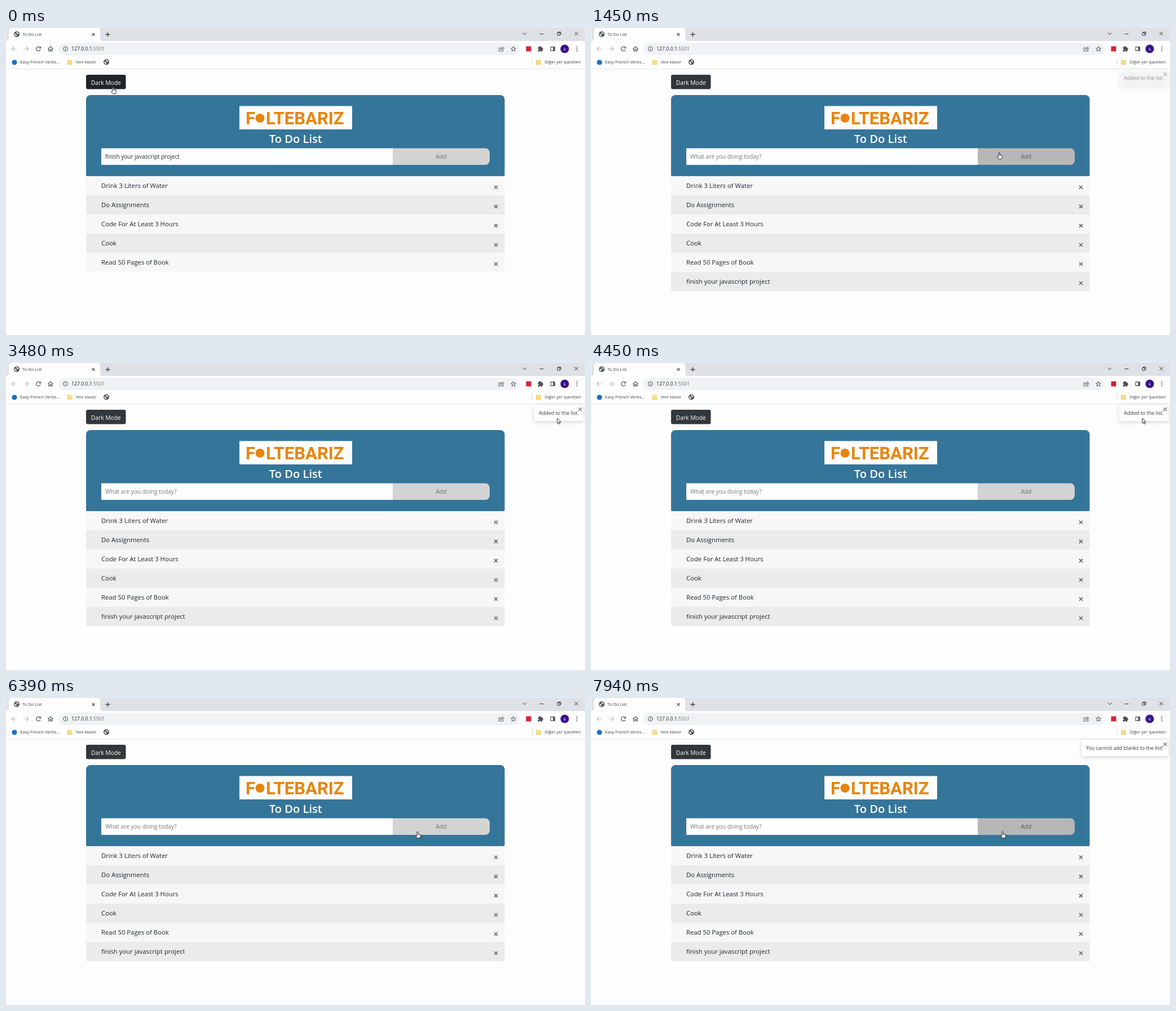
Write an HTML page with a canvas that moves like this. It is 1027 px wide and 545 px high and loops after 8 s.

```html
<!DOCTYPE html>
<html lang="en">
<head>
<meta charset="utf-8">
<title>To Do List</title>
<style>
html, body { margin: 0; width: 100%; height: 100%; overflow: hidden; background: #fdfdfd; }
canvas { display: block; width: 1027px; height: 545px; }
</style>
</head>
<body>
<canvas id="stage"></canvas>
<script>
const W = 1027, H = 545, LOOP = 8000, STEP = 96.83;
const canvas = document.getElementById('stage');
const ctx = canvas.getContext('2d');
const dpr = window.devicePixelRatio || 1;
canvas.width = W * dpr;
canvas.height = H * dpr;

const SANS = '"Open Sans", "Noto Sans", sans-serif';
const INK = '#4d5156';
const ROW_TOP = 263, ROW_H = 34.05;
const ADDED_AT = 1350;
const TASKS = ['Drink 3 Liters of Water', 'Do Assignments', 'Code For At Least 3 Hours',
  'Cook', 'Read 50 Pages of Book', 'finish your javascript project'];

// Pointer tip: time, x, y
const PATH = [
  [0, 190, 105], [100, 190, 105], [1150, 724, 221], [2000, 724, 221],
  [2600, 865, 170], [2750, 865, 170], [3500, 978, 98], [5400, 978, 98],
  [6100, 781, 267], [6380, 730, 237], [LOOP, 730, 237]
];

const clamp = v => Math.min(1, Math.max(0, v));
const ramp = (t, a, b) => clamp((t - a) / (b - a));
const ease = u => u * u * (3 - 2 * u);
const mix = (a, b, u) => a + (b - a) * u;
const rgb = (a, b, u) => `rgb(${a.map((v, i) => Math.round(mix(v, b[i], u))).join(',')})`;

function box(x, y, w, h, fill, radius = 0) {
  ctx.fillStyle = fill;
  ctx.beginPath();
  ctx.roundRect(x, y, w, h, radius);
  ctx.fill();
}

function disc(x, y, r, fill) {
  ctx.fillStyle = fill;
  ctx.beginPath();
  ctx.arc(x, y, r, 0, Math.PI * 2);
  ctx.fill();
}

function ring(x, y, r, color, width = 1, from = 0, to = Math.PI * 2) {
  ctx.strokeStyle = color;
  ctx.lineWidth = width;
  ctx.beginPath();
  ctx.arc(x, y, r, from, to);
  ctx.stroke();
}

// Strokes or fills SVG path data at an offset
function shape(d, x, y, { stroke, fill, width = 1 }) {
  ctx.save();
  ctx.translate(x, y);
  const p = new Path2D(d);
  if (fill) { ctx.fillStyle = fill; ctx.fill(p); }
  if (stroke) {
    ctx.strokeStyle = stroke;
    ctx.lineWidth = width;
    ctx.lineJoin = 'round';
    ctx.stroke(p);
  }
  ctx.restore();
}

function text(str, x, y, size, color, { align = 'left', weight = 400, family = SANS } = {}) {
  ctx.font = `${weight} ${size}px ${family}`;
  ctx.textAlign = align;
  ctx.fillStyle = color;
  ctx.fillText(str, x, y);
}

function cross(x, y, r, color, width) {
  shape(`M${-r} ${-r}L${r} ${r}M${r} ${-r}L${-r} ${r}`, x, y, { stroke: color, width });
}

function globe(x, y) {
  disc(x, y, 5, INK);
  shape('M-3.8 -1.2Q-2 -.6 -1 .6L.3 1.4L-.6 3.6Q-3.6 3 -3.8 -1.2Z', x, y, { fill: '#f4f5f6' });
  shape('M-.8 -3.8Q2.4 -3.6 3.5 -.8L1.8 .2L.6 -1.4L-.8 -1.6Z', x, y, { fill: '#f4f5f6' });
}

function folder(x, y) {
  shape('M-4.5 -4.5H-1L0 -3.4H4.5V4.5H-4.5Z', x, y, { fill: '#f8dc83' });
  box(x - 4.5, y + 3.2, 9, 1.3, '#f1cc62');
}

function tabStrip() {
  box(0, 0, W, 23, '#dee1e6');
  box(0, 0, 1, 22, '#f3f4f6');
  box(5, 0, 162, 24, '#fefefe', [5, 5, 0, 0]);
  shape('M0 23Q5 23 5 18V23ZM167 18Q167 23 172 23H167Z', 0, 0, { fill: '#fefefe' });
  globe(19, 11);
  text('To Do List', 29, 14, 7.6, '#3c4043');
  cross(155, 11.5, 2.4, '#3c4043', 1.2);
  shape('M-4 0H4M0 -4V4', 180.5, 11.5, { stroke: '#3c4043', width: 1.3 });
  shape('M-3.5 -1.7L0 1.7L3.5 -1.7', 920, 10, { stroke: '#333' });
  shape('M-3.5 0H3.5', 950, 10.5, { stroke: '#333' });
  shape('M-3 -1.5H1.5V3H-3ZM-1.5 -1.5V-3H3V1.5H1.5', 981, 10, { stroke: '#333' });
  cross(1011.5, 10, 3.2, '#333', 1);
}

function toolbar() {
  box(0, 23, W, 49, '#fefefe');
  shape('M4.5 0H-4M0 -4L-4 0L0 4', 14.5, 37, { stroke: '#babcbe', width: 1.1 });
  shape('M-4.5 0H4M0 -4L4 0L0 4', 36, 37, { stroke: '#babcbe', width: 1.1 });
  ring(57.5, 37, 3.8, INK, 1.2, 0.4, 5.5);
  shape('M4.6 -4.6V-.8H.8Z', 57.5, 37, { fill: INK });
  shape('M-4.6 .2L0 -4L4.6 .2M-3.2 -.8V4H-1V.9H1V4H3.2V-.8', 79, 37, { stroke: INK, width: 1.1 });

  box(93, 26.5, 818, 21.5, '#f0f2f4', 10.7);
  ring(105.5, 37, 3.9, INK, 1);
  shape('M0 -.5V2.2M0 -2.2V-1.2', 105.5, 37, { stroke: INK, width: 1 });
  text('127.0.0.1', 116, 40.2, 8.7, '#292c30');
  const hostWidth = ctx.measureText('127.0.0.1').width;
  text(':5501', 116 + hostWidth, 40.2, 8.7, '#6d7176');

  shape('M-1 -2H-4.4V4H3.4V2M-2 1.6Q-1.5 -1.8 2 -1.8V-3.8L5 -1L2 1.6V-.2Q-.5 -.2 -2 1.6Z',
    878.5, 37, { stroke: INK, width: 0.9 });
  let star = '';
  for (let i = 0; i < 10; i++) {
    const a = -Math.PI / 2 + i * Math.PI / 5, r = i % 2 ? 2 : 4.6;
    star += `${i ? 'L' : 'M'}${r * Math.cos(a)} ${r * Math.sin(a)}`;
  }
  shape(star + 'Z', 900, 37.4, { stroke: INK, width: 1 });
  box(922.5, 32.5, 9, 9, '#dc2033');
  box(943.5, 34, 8, 8, INK, 1);
  disc(947, 33.5, 1.5, INK);
  disc(951.5, 37.5, 1.5, INK);
  disc(943.8, 38, 1.2, '#fefefe');
  disc(947.5, 41.8, 1.2, '#fefefe');
  box(965.5, 33, 8.5, 8, INK, 1);
  box(966.7, 34.3, 3.7, 5.4, '#fefefe');
  disc(991, 37, 7.6, '#38128c');
  text('k', 991, 39.8, 8, '#eee8fa', { align: 'center' });
  for (const y of [33.5, 37, 40.5]) disc(1012.5, y, 1, INK);

  disc(15, 61, 4.6, '#1672c4');
  text('Easy French Verbs...', 25, 63, 7.65, '#3c4043');
  folder(113, 60.5);
  text('Yeni klasör', 123.5, 63, 7.35, '#3c4043');
  globe(178, 60.5);
  box(933, 55, 1, 11, '#d3d6da');
  folder(944.5, 60.5);
  text('Diğer yer işaretleri', 955.5, 63, 7.5, '#3c4043');
  box(0, 72, W, 1, '#e3e5e7');
}

function header(t) {
  box(142, 83, 70.5, 25.5, rgb([31, 37, 41], [50, 55, 59], ramp(t, 200, 350)), 3);
  text('Dark Mode', 177.3, 100.6, 10.3, '#fff', { align: 'center' });

  box(142, 119, 742.5, 144, '#357599', [8, 8, 2, 2]);
  box(414, 138.5, 200, 41.5, '#fdfdfd');
  const orange = '#e8850f';
  const bold = { weight: 700, family: 'Roboto, sans-serif' };
  text('F', 425, 171, 31, orange, bold);
  disc(450.5, 160, 8, orange);
  text('LTEBARIZ', 461, 171, 31, orange, bold);
  text('To Do List', 513.8, 204, 20.1, '#fdfdfd', { align: 'center', weight: 600 });

  box(169, 213.5, 517, 29.5, '#fefefe');
  if (t < ADDED_AT) text(TASKS[5], 176, 232.4, 10.03, '#24282c');
  else text('What are you doing today?', 176, 232.4, 10.2, '#757779');

  const dark = ramp(t, 1050, 1300) * (1 - ramp(t, 2050, 2550)) + ramp(t, 6390, 6680);
  box(686, 213.5, 172, 29.5, rgb([211, 211, 211], [183, 183, 183], dark), [0, 8, 8, 0]);
  text('Add', 771.7, 232.4, 10.3, rgb([112, 112, 112], [96, 96, 96], dark), { align: 'center' });
}

function list(t) {
  const count = t < ADDED_AT ? 5 : 6;
  for (let i = 0; i < count; i++) {
    const y = ROW_TOP + i * ROW_H;
    box(142, Math.round(y), 742.5, 34, i % 2 ? '#ebebeb' : '#f7f7f8');
    text(TASKS[i], 169, y + 21.2, 11.3, '#212529');
    cross(869, y + 19.8, 3, '#606265', 1.5);
  }
}

function toast(str, left, size, alpha) {
  if (alpha <= 0) return;
  ctx.save();
  ctx.globalAlpha = alpha;
  ctx.shadowColor = 'rgba(0,0,0,.16)';
  ctx.shadowBlur = 7 * dpr;
  ctx.shadowOffsetY = 2 * dpr;
  box(left, 73.5, 1024 - left, 29.5, '#fefefe', 2);
  ctx.shadowColor = 'transparent';
  text(str, left + 8, 92, size, '#33373b');
  cross(1018.5, 82.3, 3.1, '#65686b', 1.2);
  ctx.restore();
}

function pointerAt(t) {
  const i = Math.max(1, PATH.findIndex(p => p[0] >= t));
  const [t0, x0, y0] = PATH[i - 1], [t1, x1, y1] = PATH[i];
  const u = ease(ramp(t, t0, t1));
  return [mix(x0, x1, u), mix(y0, y1, u)];
}

function pointer(t) {
  const [x, y] = pointerAt(t);
  const inside = (l, top, r, b) => x >= l && x <= r && y >= top && y <= b;
  const hand = inside(142, 83, 212, 109) || inside(686, 214, 858, 243) ||
    inside(142, ROW_TOP, 884, 467);
  const look = { fill: '#fff', stroke: '#1c1c1c', width: 0.9 };
  if (hand) {
    shape('M-1 .8Q0 -.6 1 .8V4.2Q2 3.6 2.6 4.6Q3.6 4.1 4.1 5.1Q5.4 4.8 5.4 6.2V8.6' +
      'L4.3 11.6H-.7L-3.4 7.7Q-3.2 6.2 -1 7.6Z', x, y, look);
    shape('M1 4.4V6.4M2.6 4.8V6.6M4.1 5.2V6.8', x, y, { stroke: '#444', width: 0.5 });
  } else {
    shape('M0 0V9.2L2 7.3L3.4 10.4L4.9 9.7L3.5 6.7H6.4Z', x, y, look);
  }
}

function draw(t) {
  ctx.setTransform(dpr, 0, 0, dpr, 0, 0);
  box(0, 0, W, H, '#fdfdfd');
  tabStrip();
  toolbar();
  header(t);
  list(t);
  toast('Added to the list.', 937, 9, ramp(t, 1350, 1550) * (1 - ramp(t, 5400, 5600)));
  toast('You cannot add blanks to the list!', 870, 8.87, ramp(t, 6650, 6850));
  pointer(t);
}

function tick(now) {
  const t = now % LOOP;
  draw(Math.floor((t + 6) / STEP) * STEP);
  requestAnimationFrame(tick);
}
requestAnimationFrame(tick);
</script>
</body>
</html>
```
